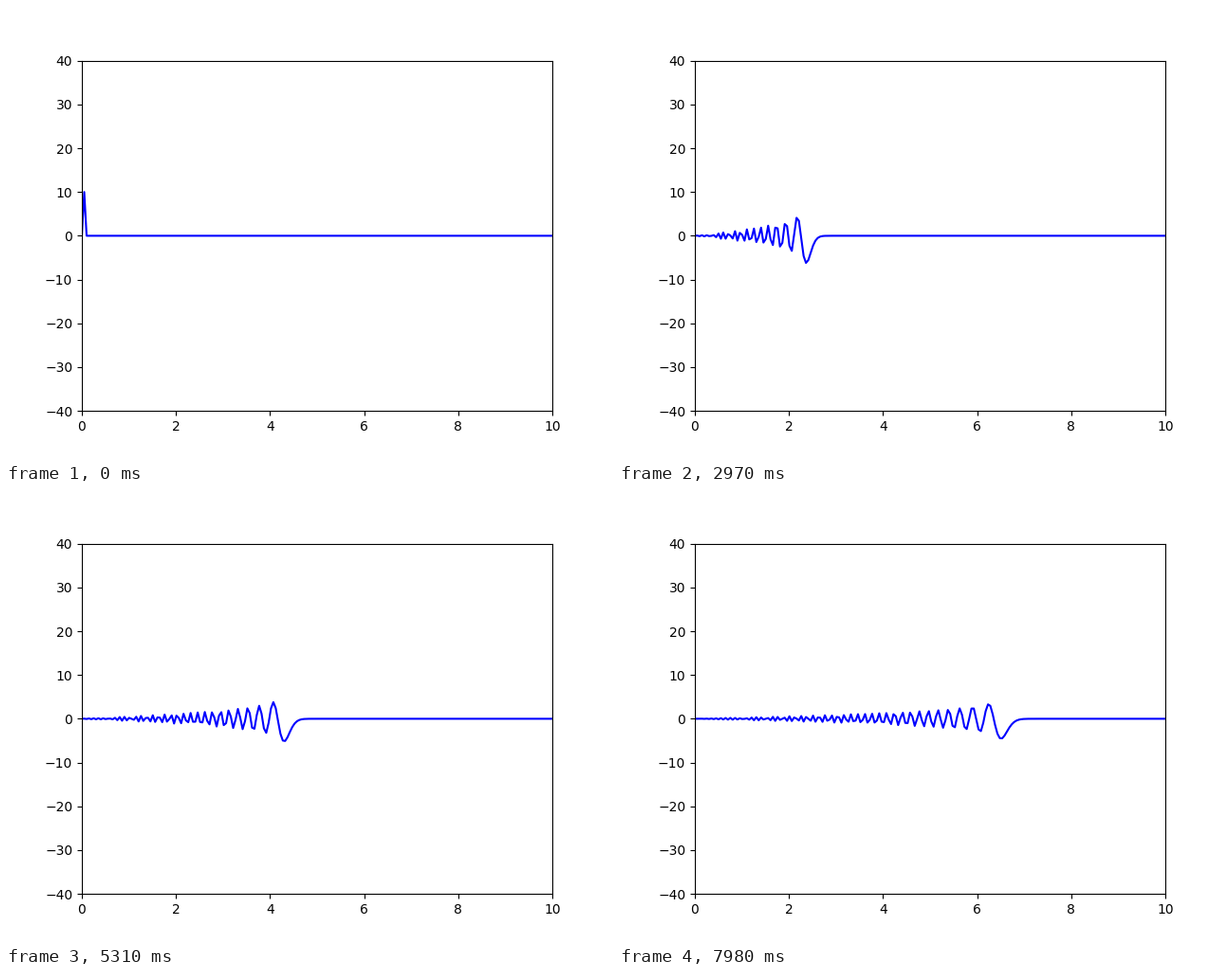
Animation of 640x480 px, one loop 8 s. Source, as a matplotlib script:

```python
import numpy as np
import matplotlib.pyplot as plt
from matplotlib.animation import FuncAnimation

LOOP_MS = 8000
STEPS = 267
POINTS = 200

x = np.linspace(0, 10, POINTS)
dt = 0.025
r2 = (dt / (x[1] - x[0])) ** 2


def solve_wave():
    """Leapfrog solution of the 1D wave equation with fixed ends."""
    u = np.zeros((STEPS, POINTS))
    u[0, 1] = 10
    for n in range(1, STEPS - 1):
        lap = u[n, 2:] - 2 * u[n, 1:-1] + u[n, :-2]
        u[n + 1, 1:-1] = 2 * u[n, 1:-1] - u[n - 1, 1:-1] + r2 * lap
    return u


wave = solve_wave()

fig, ax = plt.subplots(figsize=(6.4, 4.8), dpi=100)
ax.set_xlim(0, 10)
ax.set_ylim(-40, 40)
line, = ax.plot(x, wave[0], color="blue", lw=1.5)


def update(n):
    line.set_ydata(wave[n])
    return line,


anim = FuncAnimation(fig, update, frames=STEPS, interval=LOOP_MS / STEPS,
                     repeat=True, repeat_delay=0, blit=False)
plt.show()
```
